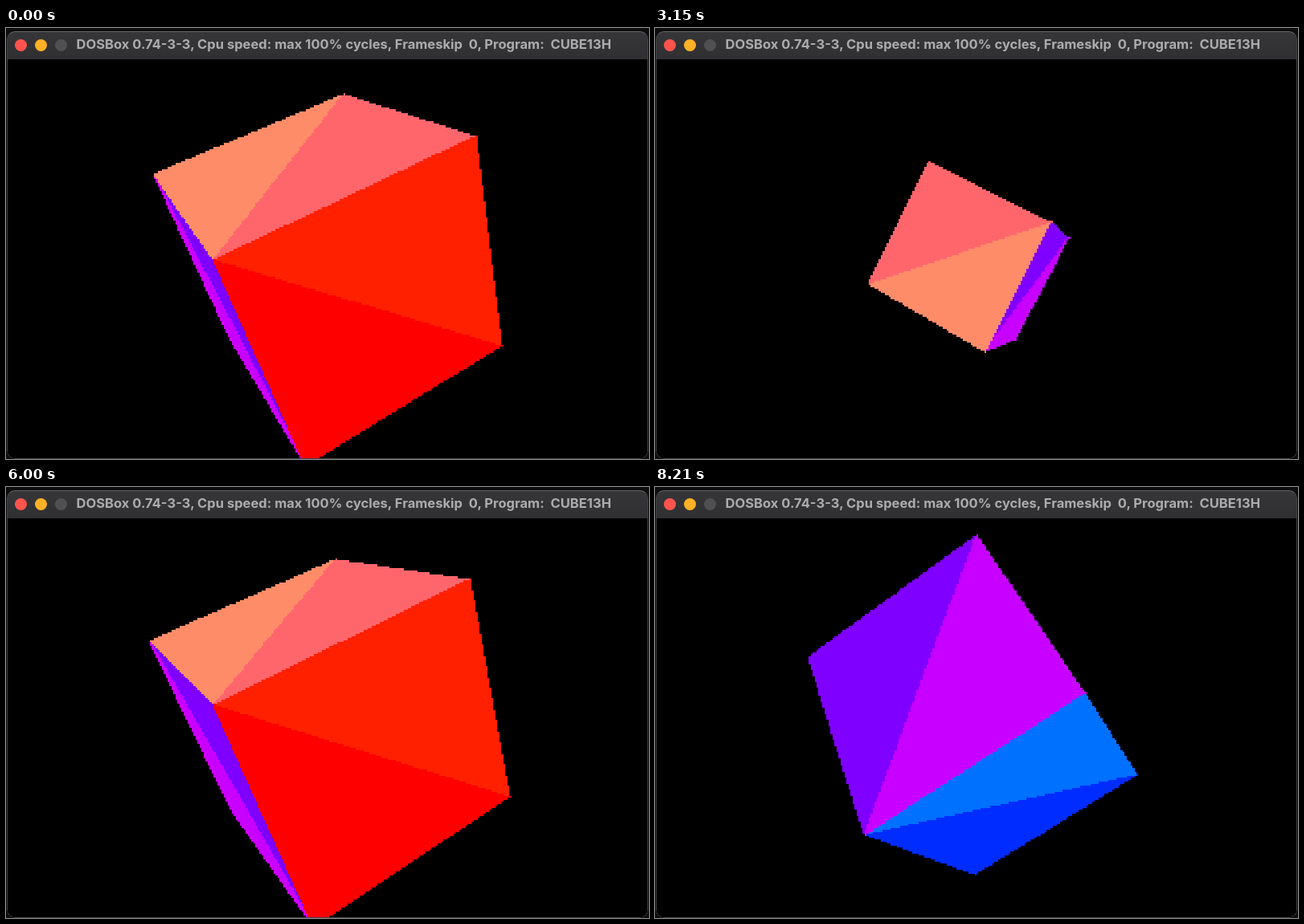
These frames come from a looping animation (800x537 px, 8240 ms). An HTML page with a canvas:

```html
<!DOCTYPE html>
<html lang="en">
<head>
<meta charset="utf-8">
<title>CUBE13H</title>
<style>
html, body { margin: 0; width: 100%; height: 100%; overflow: hidden; background: #0d0d0e; }
#win { position: absolute; left: 1px; top: 4px; width: 798px; height: 533px; box-sizing: border-box;
  border-radius: 10px; background: #000; overflow: hidden; }
#win::after { content: ""; position: absolute; inset: 0; border: 1px solid #434345; border-top-color: #646466; border-radius: 10px; }
#bar { position: absolute; left: 0; top: 0; width: 100%; height: 35px; background: linear-gradient(#363639, #303033); }
#bar i { position: absolute; top: 9.5px; width: 15px; height: 15px; border-radius: 50%; }
#bar span { position: absolute; left: 86.5px; top: 0; white-space: pre;
  font: 700 16.55px/33px Inter, "Open Sans", sans-serif; color: #acacae; }
canvas { position: absolute; left: 0; top: 0; }
</style>
</head>
<body>
<div id="win">
  <div id="bar">
    <i style="left:10px;background:#ff544d"></i>
    <i style="left:35px;background:#ffb225"></i>
    <i style="left:60px;background:#504f52"></i>
    <span>DOSBox 0.74-3-3, Cpu speed: max 100% cycles, Frameskip  0, Program:  CUBE13H</span>
  </div>
</div>
<canvas id="view" width="800" height="537"></canvas>
<script>
const LOOP = 8240, W = 320, H = 200, FOCAL = 277, SCALE = 2.4875;
const view = document.getElementById('view').getContext('2d');
const low = document.createElement('canvas');
low.width = W; low.height = H;
const g = low.getContext('2d');

// a few poses: time in ms, rotation in degrees, distance of the cube
const POSES = [
  [0, 59.6, 4.94], [1180, 106.7, 5.49], [1740, 136.5, 6.35], [2300, 171.2, 8.24],
  [3300, 250, 8.85], [4090, 314, 8.93], [4800, 363, 6], [5240, 383.9, 5.05],
  [5970, 416, 4.9], [6790, 453.9, 5.48], [8210, 515, 5.49]
];

// the axis a face is square to, the corner of its first triangle, its two colours
const FACES = [
  { axis: 0, corner: [-1, 1, -1], colors: ['#ff8c69', '#ff666c'] },
  { axis: 0, corner: [1, 1, -1], colors: ['#ffb020', '#ff8c20'] },
  { axis: 2, corner: [-1, -1, -1], colors: ['#8000ff', '#c800ff'] },
  { axis: 1, corner: [1, 1, -1], colors: ['#0070ff', '#002cff'] },
  { axis: 1, corner: [-1, -1, 1], colors: ['#ff2000', '#ff0000'] }
];

function rate(i, k) {
  const [a, b] = [POSES[i], POSES[i + 1]];
  return a && b ? (b[k] - a[k]) / (b[0] - a[0]) : null;
}

// harmonic mean of both sides, so the curve never overshoots
function slope(i, k) {
  const a = rate(i - 1, k), b = rate(i, k);
  if (a === null || b === null) return a ?? b;
  return a * b > 0 ? 2 * a * b / (a + b) : 0;
}

function track(t, k) {
  const i = Math.max(0, POSES.slice(1, -1).filter(p => p[0] <= t).length);
  const a = POSES[i], b = POSES[i + 1], d = b[0] - a[0], u = (t - a[0]) / d;
  const u2 = u * u, u3 = u2 * u;
  return a[k] * (2 * u3 - 3 * u2 + 1) + b[k] * (3 * u2 - 2 * u3)
    + d * (slope(i, k) * (u3 - 2 * u2 + u) + slope(i + 1, k) * (u3 - u2));
}

// the same angle about z, then y, then x
function rotate([x, y, z], s, c) {
  [x, y] = [x * c - y * s, x * s + y * c];
  [x, z] = [x * c + z * s, z * c - x * s];
  [y, z] = [y * c - z * s, y * s + z * c];
  return [x, y, z];
}

const flip = (p, ...axes) => p.map((v, i) => axes.includes(i) ? -v : v);

function fillTriangle(points, color) {
  const [a, b, c] = points.slice().sort((p, q) => p[1] - q[1]);
  const at = (p, q, y) => q[1] === p[1] ? q[0] : p[0] + (q[0] - p[0]) * (y - p[1]) / (q[1] - p[1]);
  g.fillStyle = color;
  for (let y = a[1]; y <= c[1]; y++) {
    const x1 = Math.floor(at(a, c, y));
    const x2 = Math.floor(y < b[1] ? at(a, b, y) : at(b, c, y));
    g.fillRect(Math.min(x1, x2), y, Math.abs(x2 - x1) + 1, 1);
  }
}

function draw(t) {
  const angle = track(t, 1) * Math.PI / 180, dist = track(t, 2);
  const s = Math.sin(angle), c = Math.cos(angle);
  const project = p => {
    const [x, y, z] = rotate(p, s, c), k = FOCAL / (z + dist);
    return [Math.floor(W / 2 + x * k), Math.floor(H / 2 + y * k)];
  };
  const facing = ({ axis, corner }) => rotate(corner.map((v, i) => i === axis ? v : 0), s, c)[2];

  g.fillStyle = '#000';
  g.fillRect(0, 0, W, H);
  FACES.filter(f => facing(f) * dist < -1)
    .sort((p, q) => facing(q) - facing(p))
    .forEach(({ axis, corner, colors }) => {
      const [u, v] = [0, 1, 2].filter(i => i !== axis);
      const ends = [project(flip(corner, u)), project(flip(corner, v))];
      fillTriangle([project(corner), ...ends], colors[0]);
      fillTriangle([project(flip(corner, u, v)), ...ends], colors[1]);
    });

  view.clearRect(0, 0, 800, 537);
  view.imageSmoothingEnabled = false;
  view.save();
  view.beginPath();
  view.roundRect(2, 39, 796, 497, [0, 0, 9, 9]);
  view.clip();
  view.drawImage(low, 2, 39, W * SCALE, H * SCALE);
  view.restore();
}

const start = performance.now();
function tick() {
  draw((performance.now() - start) % LOOP);
  requestAnimationFrame(tick);
}
tick();
</script>
</body>
</html>
```
